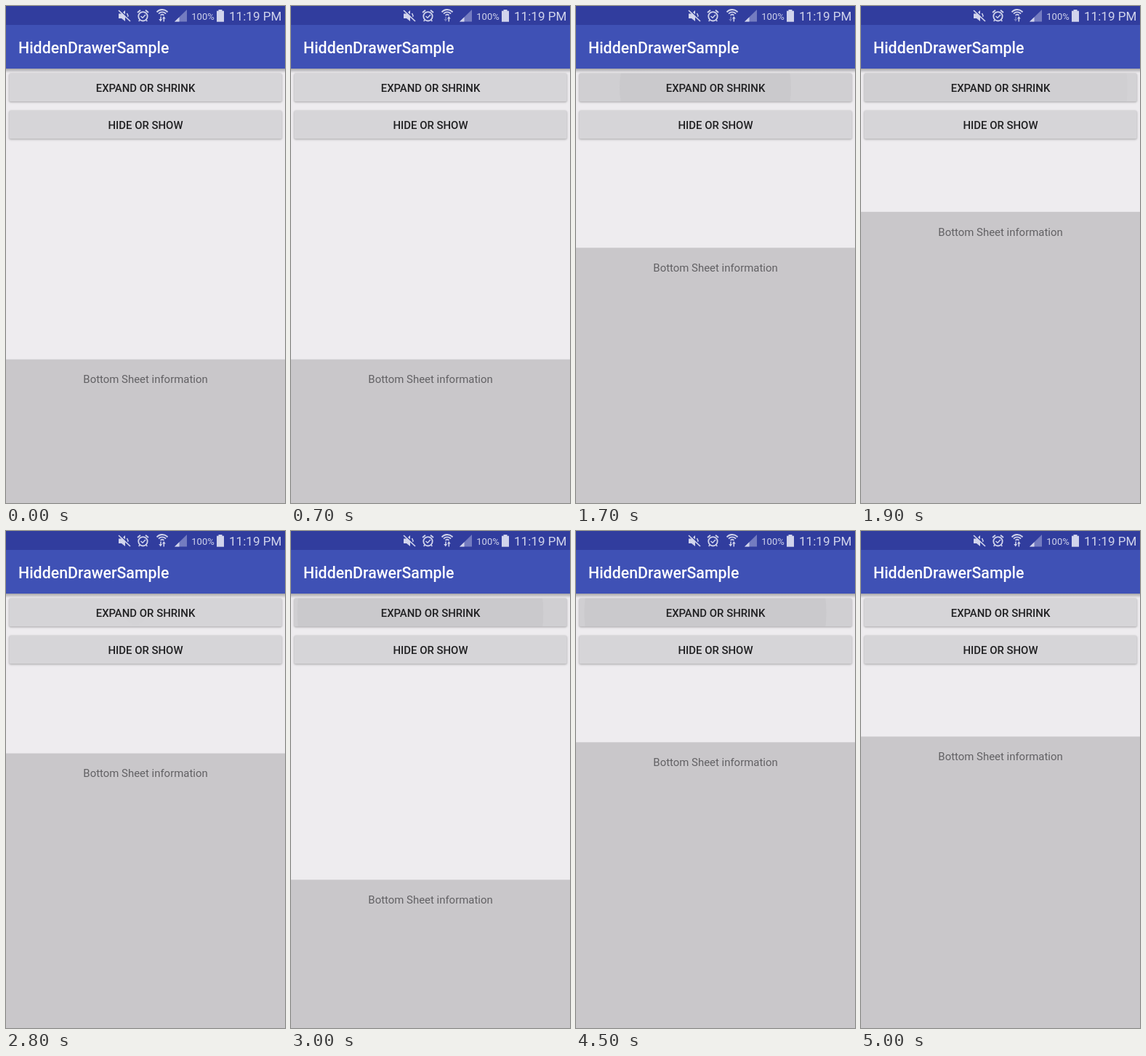
Animation of 384 by 683 pixels, one loop 5100 ms. Source, as an HTML page with a canvas:

```html
<!DOCTYPE html>
<html lang="en">
<head>
<meta charset="utf-8">
<title>Sliding sheet</title>
<style>
  html, body { margin: 0; width: 100%; height: 100%; overflow: hidden; background: #eeecef; }
  canvas { display: block; width: 384px; height: 683px; }
</style>
</head>
<body>
<canvas id="stage" width="384" height="683"></canvas>
<script>
const ctx = document.getElementById('stage').getContext('2d');
const W = 384, H = 683, LOOP = 5100;
const COLLAPSED = 485.6, EXPANDED = 282.5, SLIDE = 420;
const TAPS = [1598, 2791, 4300];
const ICON = '#d1d4ec', DIM = '#747cc0';

const clamp = (v, lo = 0, hi = 1) => Math.min(hi, Math.max(lo, v));
const settle = u => 1 - (1 - clamp(u)) ** 5;

function rect(x, y, w, h, color) {
  ctx.fillStyle = color;
  ctx.fillRect(x, y, w, h);
}

function text(str, x, y, size, color, weight = 400, align = 'left') {
  ctx.font = `${weight} ${size}px Roboto, sans-serif`;
  ctx.textAlign = align;
  ctx.fillStyle = color;
  ctx.fillText(str, x, y);
}

function poly(points, color) {
  ctx.beginPath();
  points.forEach(([x, y]) => ctx.lineTo(x, y));
  ctx.closePath();
  ctx.fillStyle = color;
  ctx.fill();
}

function line(points, width, color = ICON) {
  ctx.beginPath();
  points.forEach(([x, y]) => ctx.lineTo(x, y));
  ctx.lineWidth = width;
  ctx.strokeStyle = color;
  ctx.stroke();
}

function arc(x, y, r, from, to, width) {
  ctx.beginPath();
  ctx.arc(x, y, r, from, to);
  ctx.lineWidth = width;
  ctx.strokeStyle = ICON;
  ctx.stroke();
}

function fadeDown(y, h, alpha) {
  const g = ctx.createLinearGradient(0, y, 0, y + h);
  g.addColorStop(0, `rgba(0,0,0,${alpha})`);
  g.addColorStop(1, 'rgba(0,0,0,0)');
  rect(0, y, W, h, g);
}

function muteIcon() {
  poly([[155, 10.5], [159, 10.5], [164, 6], [164, 21], [159, 17], [155, 17]], ICON);
  line([[166.5, 10], [168, 13.5], [166.5, 17]], 1.5);
  line([[156, 5], [172, 20]], 1.6, '#313d9e');
  line([[155, 6], [171, 21]], 1.7);
}

function alarmIcon() {
  arc(188.5, 14.3, 6.2, 0, Math.PI * 2, 1.8);
  line([[181, 9], [185, 5.7]], 1.8);
  line([[192, 5.7], [196, 9]], 1.8);
  line([[184.5, 18.8], [182.7, 21]], 1.6);
  line([[192.5, 18.8], [194.3, 21]], 1.6);
  line([[185.5, 14], [188, 16.3], [192, 12]], 1.5);
}

function wifiIcon(downlink) {
  for (const r of [3.2, 6.6, 10]) arc(215, 15, r, Math.PI * 1.23, Math.PI * 1.77, 1.8);
  const down = downlink ? ICON : DIM;
  line([[213, 14.5], [213, 19]], 1.5, down);
  poly([[210.3, 18], [215, 18], [212.8, 21.5]], down);
  line([[217.3, 17], [217.3, 21.5]], 1.5);
  poly([[215, 17.5], [219.7, 17.5], [217.3, 14]], ICON);
}

function signalIcon() {
  poly([[232, 21.5], [249, 21.5], [249, 5]], DIM);
  poly([[232, 21.5], [238.5, 21.5], [238.5, 15.2]], ICON);
}

function statusBar(t) {
  rect(0, 0, W, 26, '#313d9e');
  muteIcon();
  alarmIcon();
  wifiIcon(t < 700 || t >= 2200);
  signalIcon();
  text('100%', 255.3, 18.5, 13, ICON);
  rect(292.5, 5, 5, 2, ICON);
  rect(290, 6.7, 10, 15, ICON);
  text('11:19 PM', 307, 20, 17.07, ICON);
}

function roundRect(x, y, w, h, r) {
  ctx.beginPath();
  ctx.roundRect(x, y, w, h, r);
}

function button(label, y, elapsed) {
  ctx.save();
  ctx.shadowColor = 'rgba(0,0,0,0.3)';
  ctx.shadowBlur = 2.5;
  ctx.shadowOffsetY = 1;
  roundRect(4.3, y, 375.4, 39, 2);
  ctx.fillStyle = '#d6d5d8';
  ctx.fill();
  ctx.restore();
  if (elapsed >= 0 && elapsed < 450) ripple(y, elapsed);
  text(label, W / 2, y + 25.8, 14.93, '#202022', 500, 'center');
}

function ripple(y, elapsed) {
  const strength = clamp(elapsed / 100) * clamp((430 - elapsed) / 220);
  ctx.save();
  roundRect(4.3, y, 375.4, 39, 2);
  ctx.clip();
  rect(0, y, W, 39, `rgba(0,0,0,${0.028 * strength})`);
  ctx.beginPath();
  ctx.arc(178, y + 20, 205 * (1 - Math.exp(-elapsed / 120)), 0, Math.PI * 2);
  ctx.fillStyle = `rgba(0,0,0,${0.026 * strength})`;
  ctx.fill();
  ctx.restore();
}

function sheetTop(t) {
  const tap = TAPS.filter(start => t >= start).length;
  if (!tap) return COLLAPSED;
  const opening = tap % 2 === 1;
  const from = opening ? COLLAPSED : EXPANDED;
  const to = opening ? EXPANDED : COLLAPSED;
  return from + (to - from) * settle((t - TAPS[tap - 1]) / SLIDE);
}

function draw(t) {
  const lastTap = TAPS.filter(start => t >= start).pop() ?? Infinity;
  rect(0, 0, W, H, '#eeecef');
  fadeDown(86, 6, 0.3);
  button('EXPAND OR SHRINK', 92.3, t - lastTap);
  button('HIDE OR SHOW', 143.5, -1);

  const top = sheetTop(t);
  rect(0, top, W, H - top, '#c9c7ca');
  text('Bottom Sheet information', W / 2, top + 32.8, 14.93, '#626164', 400, 'center');

  rect(0, 26, W, 60, '#3f51b5');
  text('HiddenDrawerSample', 17, 65.3, 21.33, '#fff', 500);
  statusBar(t);
}

function tick() {
  draw(performance.now() % LOOP);
  requestAnimationFrame(tick);
}
tick();
</script>
</body>
</html>
```
